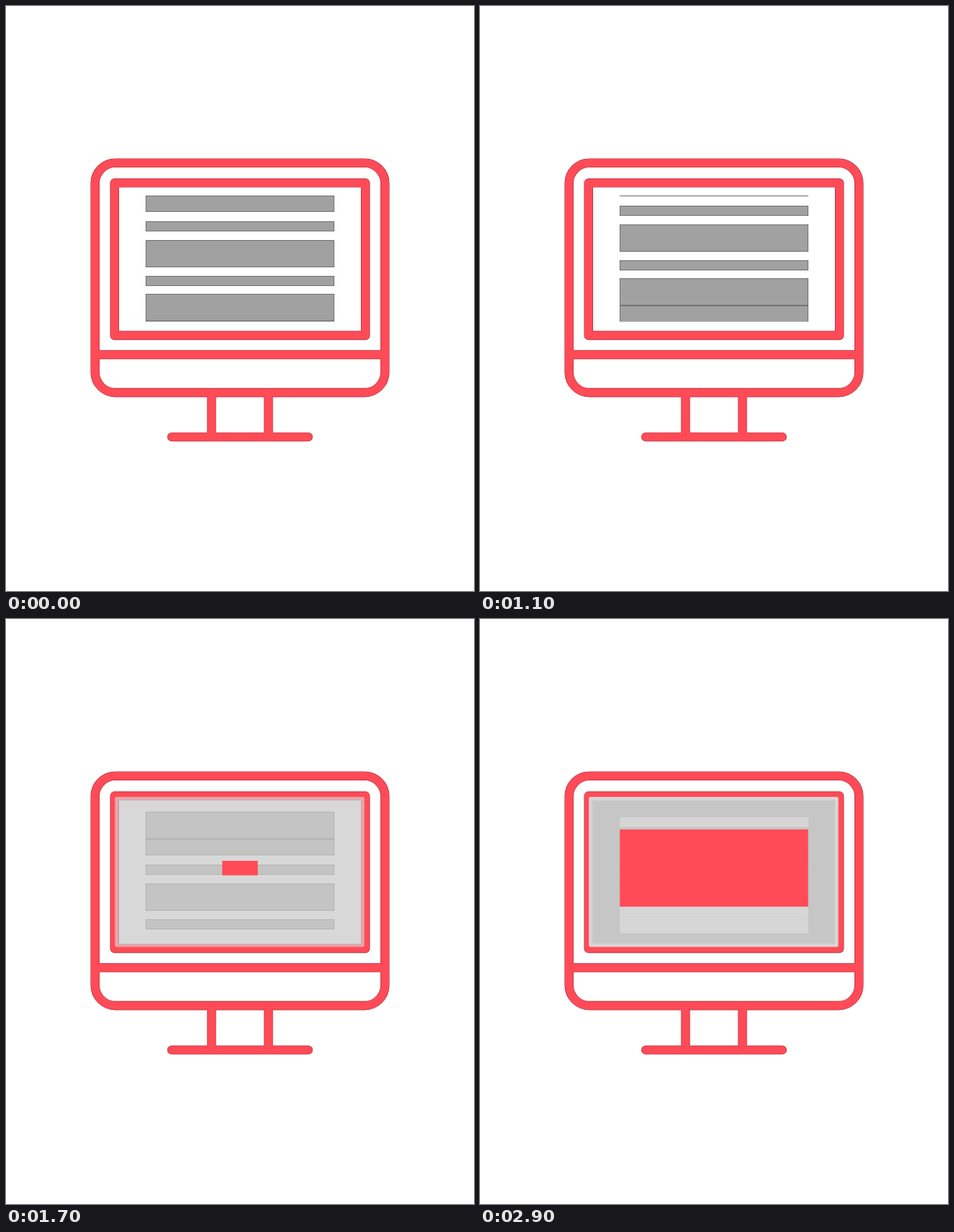
These frames come from a looping animation (600x750 px, 4900 ms). An HTML page:

```html
<!DOCTYPE html>
<html lang="en">
<head>
<meta charset="utf-8">
<title>Scrolling page with pop-up</title>
<style>
  html, body { margin: 0; width: 100%; height: 100%; overflow: hidden; background: #fff; }
  svg { display: block; width: 100%; height: 100%; }
  .edge { stroke: #a8323b; stroke-width: 11.6; }
  .body { stroke: #ff4b57; stroke-width: 10.4; }
</style>
</head>
<body>
<svg viewBox="0 0 600 750">
  <defs>
    <g id="monitor" fill="none" stroke-linejoin="round">
      <rect x="114.2" y="201.2" width="371.6" height="294.4" rx="26"/>
      <rect x="139.2" y="226.8" width="321.6" height="195.6"/>
      <path d="M114.2 447H485.8M263.5 495.6V552.5M336.5 495.6V552.5"/>
      <path d="M212.5 552.5H387.5" stroke-linecap="round"/>
    </g>
    <clipPath id="page"><rect x="179" y="243" width="242" height="161.5"/></clipPath>
  </defs>

  <use href="#monitor" class="edge"/>
  <use href="#monitor" class="body"/>

  <g id="shade" opacity="0">
    <rect x="139.5" y="228" width="320" height="192.5" rx="2" fill="#e3c9cb"/>
    <rect x="141" y="229.5" width="317" height="189.5" rx="2" fill="#d8d8d8"/>
    <rect x="143" y="231.5" width="313" height="185.5" rx="1" fill="#cecece"/>
    <rect x="145" y="233.5" width="309" height="181.5" fill="#c6c6c6"/>
  </g>
  <g clip-path="url(#page)"><g id="bars"></g></g>
  <rect id="popup" fill="#ff4b57"/>
</svg>

<script>
  const LOOP = 4900, STEP = 100;
  const PAGE_TOP = 243, PAGE_H = 161;
  const SCROLL_MS = 2900, SCROLL_PX = 343.5;
  const ROWS = [[0, 21], [33, 13], [57, 35], [103, 13], [126, 35]];

  const $ = id => document.getElementById(id);
  const shade = $('shade'), bars = $('bars'), popup = $('popup');

  const set = (el, attrs) => {
    for (const key in attrs) el.setAttribute(key, attrs[key]);
  };
  const mix = (a, b, p) => a + (b - a) * p;
  const progress = (t, from, to) => Math.min(1, Math.max(0, (t - from) / (to - from)));
  const gray = v => `rgb(${v},${v},${v})`;

  // Cubic easing with flat ends and handles at x = a and x = b
  function ease(x, a, b) {
    let lo = 0, hi = 1;
    for (let i = 0; i < 30; i++) {
      const s = (lo + hi) / 2, r = 1 - s;
      if (3 * r * r * s * a + 3 * r * s * s * b + s * s * s < x) lo = s;
      else hi = s;
    }
    return lo * lo * (3 - 2 * lo);
  }

  // Two copies of the page make the scroll wrap
  for (const copy of [0, PAGE_H]) {
    for (const [y, h] of ROWS) {
      const row = document.createElementNS('http://www.w3.org/2000/svg', 'rect');
      set(row, { x: 179.5, y: PAGE_TOP + copy + y + 0.5, width: 241, height: h - 1 });
      bars.append(row);
    }
  }

  function popupScale(t) {
    return t < 2000
      ? 1.198 * ease(progress(t, 1600, 2000), 0.33, 0.67)
      : mix(1.198, 1, ease(progress(t, 2000, 2500), 0.33, 0.67));
  }

  function draw(t) {
    const offset = Math.round(SCROLL_PX * ease(progress(t, 0, SCROLL_MS), 0.306, 0.334));
    const dim = progress(t, 1500, 1800);
    set(bars, {
      transform: `translate(0 ${-(offset % PAGE_H)})`,
      fill: gray(Math.round(mix(161, 214, dim))),
      stroke: gray(Math.round(mix(118, 211, dim)))
    });
    set(shade, { opacity: dim });

    const w = 241.5 * popupScale(t), h = w * 0.41;
    set(popup, { x: 300 - w / 2, y: 319.3 - h / 2, width: w, height: h });
  }

  function tick() {
    const t = performance.now() % LOOP;
    draw(Math.floor(t / STEP) * STEP);
    requestAnimationFrame(tick);
  }
  tick();
</script>
</body>
</html>
```
